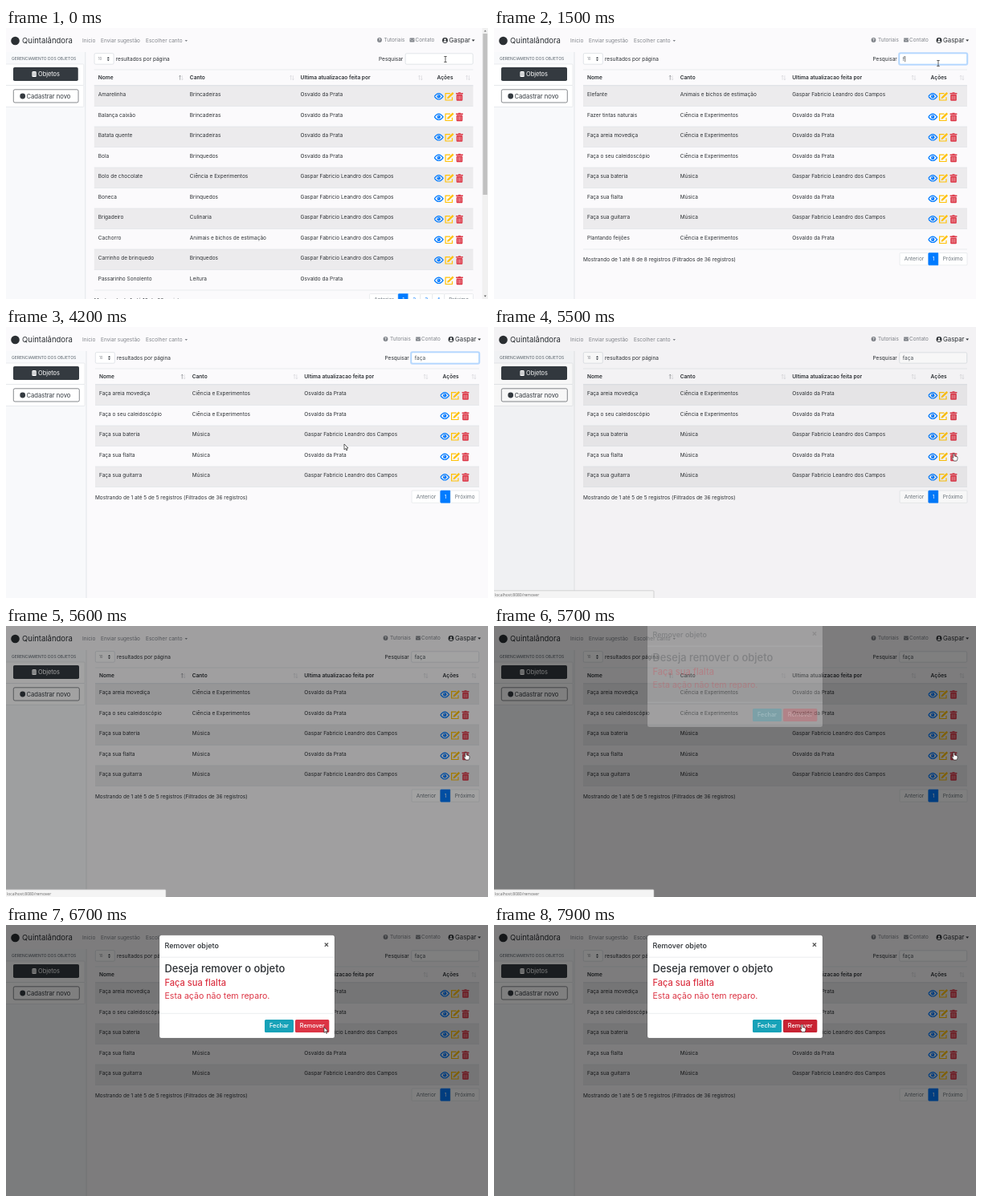
Write an HTML page with a canvas that moves like this. It is 600 by 338 pixels and loops after 8 s.

```html
<!DOCTYPE html>
<html lang="pt-BR">
<head>
<meta charset="utf-8">
<title>Quintalândora</title>
<style>
  html, body { margin: 0; width: 100%; height: 100%; overflow: hidden; background: #fbfafc; }
  canvas { display: block; width: 600px; height: 338px; }
</style>
</head>
<body>
<canvas id="stage"></canvas>
<script>
const canvas = document.getElementById('stage');
const ctx = canvas.getContext('2d');
const ratio = window.devicePixelRatio || 1;
canvas.width = 600 * ratio;
canvas.height = 338 * ratio;

const LOOP = 8000, TICK = 100;
const INK = '#2b2f33', GRAY = '#80848a', LINE = '#dee1e5';
const BLUE = '#007bff', YELLOW = '#ffc107', RED = '#dc3545', DARK = '#343a40';
const ROW_TOP = 72, ROW_H = 25.5;

const ANA = 'Osvaldo da Prata', GAS = 'Gaspar Fabricio Leandro dos Campos';
const PLAY = 'Brincadeiras', TOYS = 'Brinquedos', LAB = 'Ciência e Experimentos';
const PETS = 'Animais e bichos de estimação', MUSIC = 'Música';
const RECORDS = [
  ['Amarelinha', PLAY, ANA],
  ['Balança caixão', PLAY, ANA],
  ['Batata quente', PLAY, ANA],
  ['Bola', TOYS, ANA],
  ['Bolo de chocolate', LAB, GAS],
  ['Boneca', TOYS, GAS],
  ['Brigadeiro', 'Culinaria', GAS],
  ['Cachorro', PETS, GAS],
  ['Carrinho de brinquedo', TOYS, GAS],
  ['Passarinho Sonolento', 'Leitura', ANA],
  ['Elefante', PETS, GAS],
  ['Fazer tintas naturais', LAB, ANA],
  ['Faça areia movediça', LAB, ANA],
  ['Faça o seu caleidoscópio', LAB, ANA],
  ['Faça sua bateria', MUSIC, GAS],
  ['Faça sua flalta', MUSIC, ANA],
  ['Faça sua guitarra', MUSIC, GAS],
  ['Plantando feijões', LAB, ANA]
];
const TYPING = [[0, ''], [1400, 'f'], [1700, 'fa'], [2000, 'faç'], [2300, 'faça']];
const FOCUS = 1000, BLUR = 5400;
const POINTER = [
  [100, 547, 39], [800, 553, 44], [3300, 553, 44], [4100, 421, 146], [4300, 421, 146],
  [5100, 572.5, 158], [6000, 572.5, 158], [6800, 388, 126], [7100, 383.5, 124.5]
];

const clamp = v => Math.max(0, Math.min(1, v));
const progress = (t, start, length) => clamp((t - start) / length);
const smooth = p => p * p * (3 - 2 * p);

// y is the middle of the capitals
function text(str, x, y, size = 6.5, color = INK, weight = 400, align = 'left', family = 'Inter') {
  ctx.font = `${weight} ${size}px ${family}, sans-serif`;
  ctx.fillStyle = color;
  ctx.textAlign = align;
  ctx.fillText(str, x, y + size * 0.35);
}

function box(x, y, w, h, fill, stroke, radius = 0, width = 0.6) {
  ctx.beginPath();
  ctx.roundRect(x, y, w, h, radius);
  if (fill) { ctx.fillStyle = fill; ctx.fill(); }
  if (stroke) { ctx.strokeStyle = stroke; ctx.lineWidth = width; ctx.stroke(); }
}

function disc(x, y, r, color) {
  ctx.beginPath();
  ctx.arc(x, y, r, 0, Math.PI * 2);
  ctx.fillStyle = color;
  ctx.fill();
}

function poly(points, fill, stroke, width = 0.7) {
  ctx.beginPath();
  points.forEach(([x, y]) => ctx.lineTo(x, y));
  ctx.closePath();
  if (fill) { ctx.fillStyle = fill; ctx.fill(); }
  if (stroke) { ctx.strokeStyle = stroke; ctx.lineWidth = width; ctx.stroke(); }
}

function line(color, width, ...points) {
  ctx.beginPath();
  points.forEach(([x, y]) => ctx.lineTo(x, y));
  ctx.strokeStyle = color;
  ctx.lineWidth = width;
  ctx.stroke();
}

function at(x, y, draw) {
  ctx.save();
  ctx.translate(x, y);
  draw();
  ctx.restore();
}

const triangle = (x, y, w, h, color) => poly([[x - w, y], [x + w, y], [x, y + h]], color);

function sortArrow(x, dir, color) {
  line(color, 0.6, [x, 62 - 2.8 * dir], [x, 62 + 2.8 * dir]);
  line(color, 0.6, [x - 1.1, 62 + 1.5 * dir], [x, 62 + 2.8 * dir], [x + 1.1, 62 + 1.5 * dir]);
}

function eyeIcon() {
  ctx.beginPath();
  ctx.moveTo(-5.4, 0);
  ctx.quadraticCurveTo(0, -7.4, 5.4, 0);
  ctx.quadraticCurveTo(0, 7.4, -5.4, 0);
  ctx.strokeStyle = BLUE;
  ctx.lineWidth = 1.2;
  ctx.stroke();
  disc(0, 0, 2.2, BLUE);
  disc(-0.7, -0.7, 0.7, '#cfe5ff');
}

function editIcon() {
  line(YELLOW, 1.2, [1, -3.7], [-4.9, -3.7], [-4.9, 4.7], [3.5, 4.7], [3.5, 1]);
  line(YELLOW, 2.4, [-1.6, 1.7], [4.7, -4.4]);
  poly([[-2.9, 2.9], [-2.4, 0.5], [-0.5, 2.4]], YELLOW);
}

function trashIcon() {
  box(-4.5, -4.4, 9, 1.4, RED, null, 0.4);
  box(-1.5, -5.2, 3, 1, RED);
  box(-3.8, -2.4, 7.6, 7.6, RED, null, 0.9);
  for (const x of [-1.8, 0, 1.8]) line('#f3d5d9', 0.6, [x, -1.1], [x, 3.9]);
}

function navbar(w) {
  disc(11.5, 16, 5.3, INK);
  text('Quintalândora', 20, 16, 9.5, INK);
  text('Inicio', 95, 16, 6.5, GRAY);
  text('Enviar sugestão', 118, 16, 6.5, GRAY);
  text('Escolher canto', 174, 16, 6.5, GRAY);
  triangle(224.3, 15, 1.7, 1.9, GRAY);

  disc(w - 127.5, 15, 2.9, GRAY);
  text('?', w - 127.5, 15, 4.5, '#fff', 700, 'center');
  text('Tutoriais', w - 122, 15, 6.4, GRAY);
  box(w - 90, 12.6, 6, 4.8, GRAY, null, 0.6);
  line('#fff', 0.5, [w - 90, 13.8], [w - 87, 15.7], [w - 84, 13.8]);
  text('Contato', w - 83, 15, 6.4, GRAY);
  disc(w - 46, 15.5, 3.4, INK);
  disc(w - 46, 14.5, 1.2, '#fff');
  box(w - 48, 16.2, 4, 1.7, '#fff', null, 0.8);
  text('Gaspar', w - 41, 15.5, 7.8, INK);
  triangle(w - 10.8, 14.6, 1.9, 2.1, INK);
}

function sidebar(side) {
  ctx.fillStyle = '#f8f9fb';
  ctx.fillRect(0, 30, side, 308);
  line(LINE, 0.8, [side, 30], [side, 338]);
  text('GERENCIAMENTO DOS OBJETOS', 7, 38.5, 5, '#6c757d', 500);
  box(-2, 45, side, 26.5, '#fff', LINE, 1);
  box(-2, 71.5, side, 27, '#fff', LINE, 1);

  const w = side - 18;
  box(9, 49, w, 17, DARK, null, 1.8);
  box(32.3, 54, 5.6, 7, '#fff', null, 1.5);
  for (const y of [56.2, 58.6]) line(DARK, 0.5, [32.3, y], [37.9, y]);
  text('Objetos', 40, 57.5, 7.4, '#fff');
  box(9.3, 76.8, w, 16.2, '#fff', DARK, 1.8);
  disc(20.7, 85, 3.4, DARK);
  text('Cadastrar novo', 25.5, 85, 7.6, DARK);
}

function controls(w, left, query, t) {
  box(left + 0.3, 31.6, 24, 13.6, '#fff', '#ced4da', 1.5);
  text('10', left + 5, 38.5, 4.3, GRAY);
  poly([[left + 16, 38], [left + 19, 38], [left + 17.5, 36]], DARK);
  triangle(left + 17.5, 39.2, 1.5, 2, DARK);
  text('resultados por página', left + 27, 38.5);
  text('Pesquisar', w - 128.5, 38.5);

  const x = w - 95.3, focused = t >= FOCUS && t < BLUR;
  if (focused) box(x - 0.8, 31, 85.6, 15, null, 'rgba(0,123,255,.25)', 2, 1.5);
  box(x, 31.8, 84, 13.4, '#fff', focused ? '#80bdff' : '#ced4da', 1.5);
  text(query, x + 4, 38.5, 6.5, '#495057');
  const lastKey = t < 1400 ? FOCUS : TYPING.filter(k => k[0] <= t).pop()[0];
  if (focused && (t - lastKey) % 1000 < 500) {
    const end = x + 4.6 + ctx.measureText(query).width;
    line('#222', 0.6, [end, 35], [end, 42.3]);
  }
}

function table(w, left, rows) {
  const width = w - 11 - left, right = left + width;
  const canto = left + width * 0.2525, author = left + width * 0.5445, actions = left + width * 0.926;
  line(LINE, 0.6, [left, 52], [right, 52]);
  text('Nome', left + 5, 61.8, 6.6, INK, 600);
  text('Canto', canto, 61.8, 6.6, INK, 600);
  text('Ultima atualizacao feita por', author, 61.8, 6.6, INK, 600);
  text('Ações', actions, 61.8, 6.6, INK, 600, 'center');
  [0.2265, 0.519, 0.858, 0.9835].forEach((f, i) => {
    sortArrow(left + width * f, -1, i ? '#d0d1d5' : '#777b80');
    sortArrow(left + width * f + 2.8, 1, '#d0d1d5');
  });

  rows.forEach(([name, place, by], i) => {
    const y = ROW_TOP + i * ROW_H;
    if (i % 2 === 0) {
      ctx.fillStyle = 'rgba(0,0,0,.06)';
      ctx.fillRect(left, y, width, ROW_H);
    }
    line(LINE, 0.6, [left, y], [right, y]);
    text(name, left + 5, y + 11);
    text(place, canto, y + 11);
    text(by, author, y + 11);
    at(w - 53.8, y + 13.3, eyeIcon);
    at(w - 40.5, y + 13.3, editIcon);
    at(w - 28, y + 13.5, trashIcon);
  });
  line(LINE, 1, [left, 71.7], [right, 71.7]);
}

function footer(left, right, count, filtered) {
  const y = ROW_TOP + count * ROW_H;
  line(LINE, 0.6, [left, y], [right, y]);
  text(filtered
    ? `Mostrando de 1 até ${count} de ${count} registros (Filtrados de 36 registros)`
    : 'Mostrando de 1 até 10 de 36 registros', left, y + 13);
  const cells = ['Anterior', ...(filtered ? ['1'] : ['1', '2', '3', '4']), 'Próximo'];
  const widths = cells.map(c => c === '1' ? 12.5 : c.length > 1 ? 35.7 : 15);
  let x = right - widths.reduce((a, b) => a + b);
  cells.forEach((cell, i) => {
    const active = cell === '1';
    box(x, y + 4.5, widths[i], 15.3, active ? BLUE : '#fff', active ? BLUE : LINE, 1);
    const color = active ? '#fff' : cell.length > 1 ? '#6c757d' : BLUE;
    text(cell, x + widths[i] / 2, y + 12.2, 6.5, color, 400, 'center');
    x += widths[i];
  });
}

function scrollbar() {
  ctx.fillStyle = '#f1f1f1';
  ctx.fillRect(592.8, 0, 7.2, 338);
  ctx.fillStyle = '#c1c1c1';
  ctx.fillRect(593.6, 7, 5.6, 201);
  poly([[595, 4.6], [598, 4.6], [596.5, 2.6]], '#777');
  triangle(596.5, 333.4, 1.5, 2, '#555');
}

function modal(t) {
  const shade = 0.5 * progress(t, 5490, 150);
  if (!shade) return;
  ctx.fillStyle = `rgba(0,0,0,${shade})`;
  ctx.fillRect(0, 0, 600, 338);
  const slide = progress(t, 5660, 300);
  ctx.save();
  ctx.globalAlpha = progress(t, 5660, 150);
  ctx.translate(0, -20 * (1 - slide) ** 2);
  box(191, 12.7, 218, 128.3, '#fff', 'rgba(0,0,0,.2)', 2.5);
  text('Remover objeto', 197.5, 26, 9, INK, 500);
  text('×', 399, 24.5, 10, '#555', 700, 'center');
  line(LINE, 0.6, [191, 40.2], [409, 40.2]);
  text('Deseja remover o objeto', 197.5, 54.5, 12.9, INK, 500);
  text('Faça sua flalta', 197.5, 72, 11.1, RED, 500);
  text('Esta ação não tem reparo.', 197.5, 88.7, 10.6, RED);
  line(LINE, 0.6, [191, 110.3], [409, 110.3]);
  box(322, 118, 36, 16, '#17a2b8', null, 1.6);
  text('Fechar', 340, 125.8, 7.3, '#fff', 500, 'center');
  box(360, 118, 42.3, 16, t >= 6800 ? '#c82333' : RED, null, 1.6);
  text('Remover', 381.2, 125.8, 7.3, '#fff', 500, 'center');
  ctx.restore();
}

function statusBar(t) {
  if (t < 5200) return;
  ctx.save();
  ctx.globalAlpha = 1 - progress(t, 5800, 200);
  box(-1, 328.8, 200, 11, '#f4f4f4', '#bbb', 1);
  text('localhost:8080/remover', 1, 333.8, 5, '#666', 400, 'left', 'Open Sans');
  ctx.restore();
}

function pointerAt(t) {
  const next = POINTER.findIndex(k => k[0] > t);
  if (next === 0) return POINTER[0].slice(1);
  if (next < 0) return POINTER[POINTER.length - 1].slice(1);
  const [t0, x0, y0] = POINTER[next - 1], [t1, x1, y1] = POINTER[next];
  const p = smooth((t - t0) / (t1 - t0));
  return [x0 + (x1 - x0) * p, y0 + (y1 - y0) * p];
}

function beam() {
  line('#222', 0.7, [0, -3.4], [0, 3.4]);
  for (const y of [-3.5, 3.5]) line('#222', 0.7, [-1.7, y], [1.7, y]);
}

function arrow() {
  poly([[0, 0], [0, 7], [1.7, 5.5], [2.8, 8], [3.9, 7.5], [2.8, 5.1], [5, 5]], '#fff', '#222');
}

function hand() {
  poly([[-0.8, 0], [0.7, 0], [0.8, 3], [4.4, 3.9], [4.5, 6.6], [3.6, 9],
    [-0.2, 9], [-2.4, 5.6], [-1.9, 4.6], [-0.8, 5.5]], '#fff', '#222', 0.6);
}

function pointer(t) {
  const [x, y] = pointerAt(t);
  const onTrash = t >= 5100 && t <= 6000, onButton = t >= 6800;
  at(x, y, t < 3500 ? beam : onTrash || onButton ? hand : arrow);
}

function render(t) {
  const query = TYPING.filter(k => k[0] <= t).pop()[1];
  const rows = RECORDS.filter(r => r[0].toLowerCase().includes(query)).slice(0, 10);
  const w = query ? 600 : 592.5, side = w / 6, left = side + 11;
  ctx.setTransform(ratio, 0, 0, ratio, 0, 0);
  ctx.fillStyle = '#fbfafc';
  ctx.fillRect(0, 0, 600, 338);
  navbar(w);
  sidebar(side);
  controls(w, left, query, t);
  table(w, left, rows);
  footer(left, w - 11, rows.length, query !== '');
  if (!query) scrollbar();
  modal(t);
  statusBar(t);
  pointer(t);
}

const start = performance.now();
function loop() {
  const t = (performance.now() - start) % LOOP;
  render(Math.floor(t / TICK) * TICK);
  requestAnimationFrame(loop);
}
loop();
</script>
</body>
</html>
```
